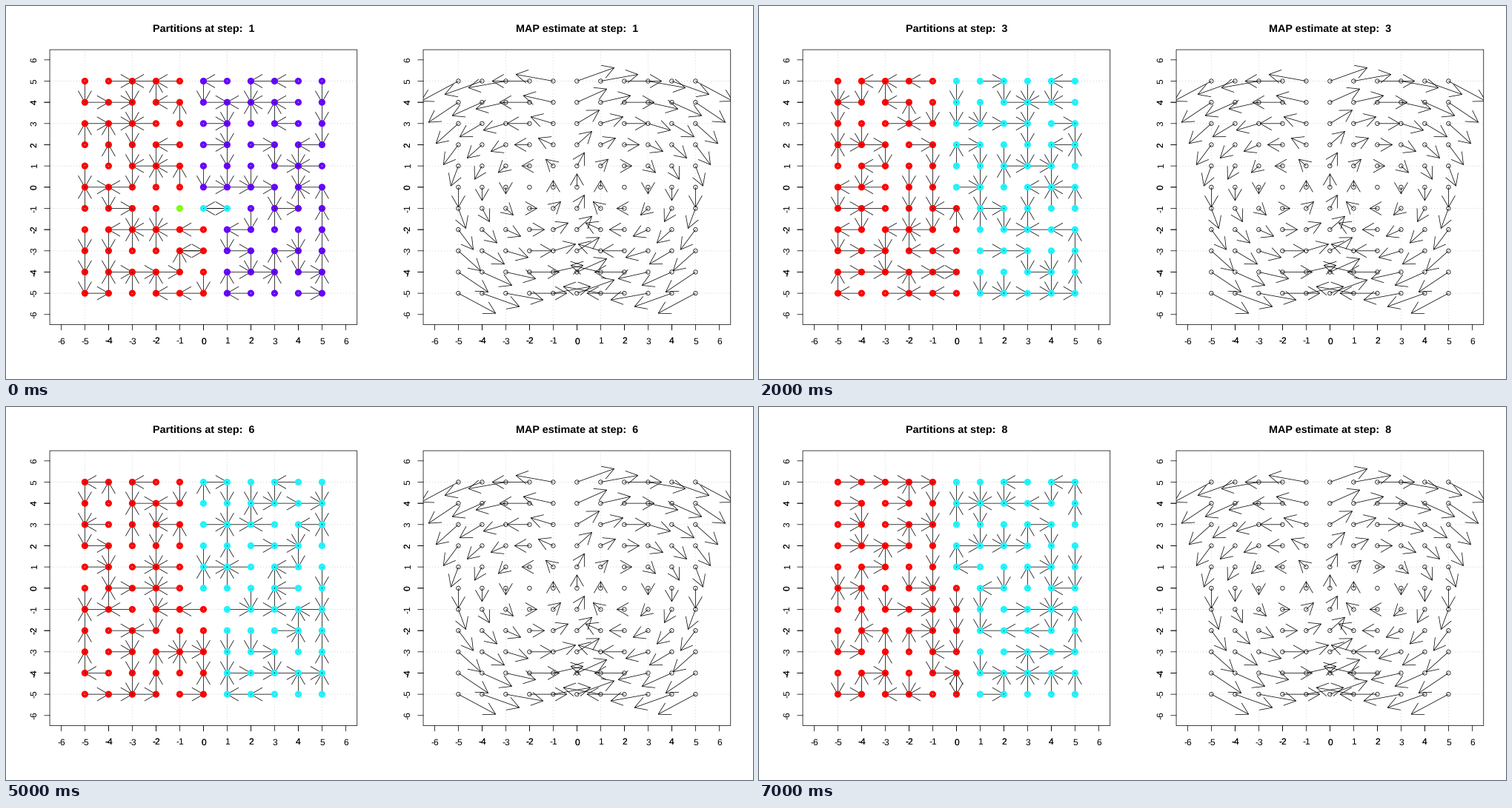
These frames come from a looping animation (1008x504 px, 8 s). A matplotlib script:

```python
import math
import random

import matplotlib.pyplot as plt
from matplotlib.animation import FuncAnimation
from matplotlib.collections import LineCollection
from matplotlib.patches import Rectangle

W, H = 1008, 504
STEPS = 8
LINE = 14.4                                  # height of one margin line
LEFT, TOP, RIGHT, BOTTOM = 59.04, 59.04, 473.76, 430.56
UNIT_X, UNIT_Y = 32, (BOTTOM - TOP) / 12.96
INK = 0.75
CELLS = [(x, y) for y in range(5, -6, -1) for x in range(-5, 6)]

RED, CYAN, BLUE = "#ff0000", "#1cf4ff", "#0000ff"
LIME, GREEN, PURPLE = "#7cff00", "#1cff00", "#6600ff"

# Per step: (root, partner) of the red tree and root of the tree on the right
ROOTS = [
    ((0, -3), (-1, -3), (4, 0)),
    ((0, -4), None, (4, -2)),
    ((0, -4), (-1, -4), (3, -1)),
    ((-1, -4), None, (2, -2)),
    ((-1, -3), None, (3, -2)),
    ((0, -4), None, (3, 1)),
    ((0, -4), None, (3, 0)),
    ((0, -4), (0, -5), (1, -2)),
]

plt.rcParams.update({"font.family": "Liberation Sans", "path.snap": False,
                     "text.hinting": "none"})
fig = plt.figure(figsize=(W / 72, H / 72), dpi=72, facecolor="white")
ax = fig.add_axes([0, 0, 1, 1])
ax.set_xlim(0, W)
ax.set_ylim(H, 0)
ax.axis("off")


def to_px(x, y, offset=0):
    return (offset + (LEFT + RIGHT) / 2 + UNIT_X * x,
            (TOP + BOTTOM) / 2 - UNIT_Y * y)


def arrow(start, end, head=18, spread=math.pi / 6):
    """Shaft and open head as two polylines."""
    (x0, y0), (x1, y1) = start, end
    back = math.atan2(y0 - y1, x0 - x1)
    barbs = [(x1 + head * math.cos(back + s), y1 + head * math.sin(back + s))
             for s in (-spread, spread)]
    return [[start, end], [barbs[0], end, barbs[1]]]


def draw_panel(offset):
    edge = LEFT + offset
    box = Rectangle((edge, TOP), RIGHT - LEFT, BOTTOM - TOP,
                    fill=False, ec="black", lw=INK, zorder=4)
    ax.add_patch(box)
    dots = dict(color="lightgray", lw=1, ls=(0, (1, 3)), zorder=1)
    for k in range(-5, 6, 2):
        gx, gy = to_px(k, k, offset)
        ax.plot([gx, gx], [BOTTOM, TOP], **dots)
        ax.plot([edge, RIGHT + offset], [gy, gy], **dots)
    # Two overlaid axes: even ticks, then every integer from -5 to 5
    pen = dict(color="black", lw=INK, zorder=4)
    label = dict(size=12, ha="center", va="baseline", rotation_mode="anchor")
    for ticks in (range(-6, 7, 2), range(-5, 6)):
        for k in ticks:
            tx, ty = to_px(k, k, offset)
            ax.plot([tx, tx], [BOTTOM, BOTTOM + LINE / 2], **pen)
            ax.plot([edge, edge - LINE / 2], [ty, ty], **pen)
            ax.text(tx, BOTTOM + 1.8 * LINE, str(k), **label)
            ax.text(edge - 1.2 * LINE, ty, str(k), rotation=90, **label)
    return box


def add_arrows(segments, box):
    lines = LineCollection(segments, colors="black", linewidths=INK, zorder=2)
    ax.add_collection(lines, autolim=False)
    lines.set_clip_path(box)
    return lines


def add_rings(offset, width):
    xs, ys = zip(*(to_px(x, y, offset) for x, y in CELLS))
    return ax.scatter(xs, ys, s=5.4 ** 2, facecolors="none",
                      edgecolors="black", linewidths=width, zorder=3)


def add_title(offset):
    return ax.text(offset + (LEFT + RIGHT) / 2, 34.8, "", size=14.4,
                   weight="bold", ha="center", va="baseline")


def rotation_field(x, y):
    """Two counter-rotating swirls centred at x = -2 and x = 2."""
    rate = math.pi / 10
    if x < 0 or (x == 0 and y < 0):
        return -rate * y, rate * (x + 2)
    return rate * y, -rate * (x - 2)


def cell_color(cell, step):
    x, y = cell
    if step == 0 and y == -1 and -1 <= x <= 1:
        return LIME if x < 0 else CYAN
    if step == 1 and cell == (0, -1):
        return GREEN
    top_red = 0 if step == 7 else -1
    if x < 0 or (x == 0 and y <= top_red):
        return RED
    return (PURPLE, BLUE)[step] if step < 2 else CYAN


def spanning_links(cells, root, partner, rng):
    """Random tree in which every cell links one step towards the root."""
    members = set(cells)
    links, done = {}, {root}
    if partner:
        links[root], links[partner] = partner, root
        done.add(partner)
    for first in cells:
        cell = first
        while cell not in done:
            x, y = cell
            near = [(x - 1, y), (x + 1, y), (x, y + 1), (x, y - 1)]
            links[cell] = rng.choice([n for n in near if n in members])
            cell = links[cell]
        cell = first
        while cell not in done:
            done.add(cell)
            cell = links[cell]
    return links


def partition(step):
    rng = random.Random(40 + step)
    colors = [cell_color(c, step) for c in CELLS]
    red_root, red_partner, right_root = ROOTS[step]
    groups = [(RED, red_root, red_partner),
              (cell_color((5, 5), step), right_root, None)]
    if step == 0:
        groups.append((CYAN, (0, -1), (1, -1)))
    segments = []
    for color, root, partner in groups:
        cells = [c for c, own in zip(CELLS, colors) if own == color]
        for a, b in spanning_links(cells, root, partner, rng).items():
            segments += arrow(to_px(*a), to_px(*b))
    return segments, colors


left_box, right_box = draw_panel(0), draw_panel(W / 2)
titles = [add_title(0), add_title(W / 2)]
links = add_arrows([], left_box)
dots = add_rings(0, 3.75)
add_rings(W / 2, INK)

field = []
for x, y in CELLS:
    dx, dy = rotation_field(x, y)
    if dx or dy:
        field += arrow(to_px(x, y, W / 2), to_px(x + dx, y + dy, W / 2))
add_arrows(field, right_box)


def update(step):
    segments, colors = partition(step)
    links.set_segments(segments)
    dots.set_edgecolors(colors)
    for title, name in zip(titles, ("Partitions", "MAP estimate")):
        title.set_text(f"{name} at step:  {step + 1}")
    return [links, dots, *titles]


anim = FuncAnimation(fig, update, frames=STEPS, interval=1000, repeat=True,
                     repeat_delay=0, blit=False)
plt.show()
```
